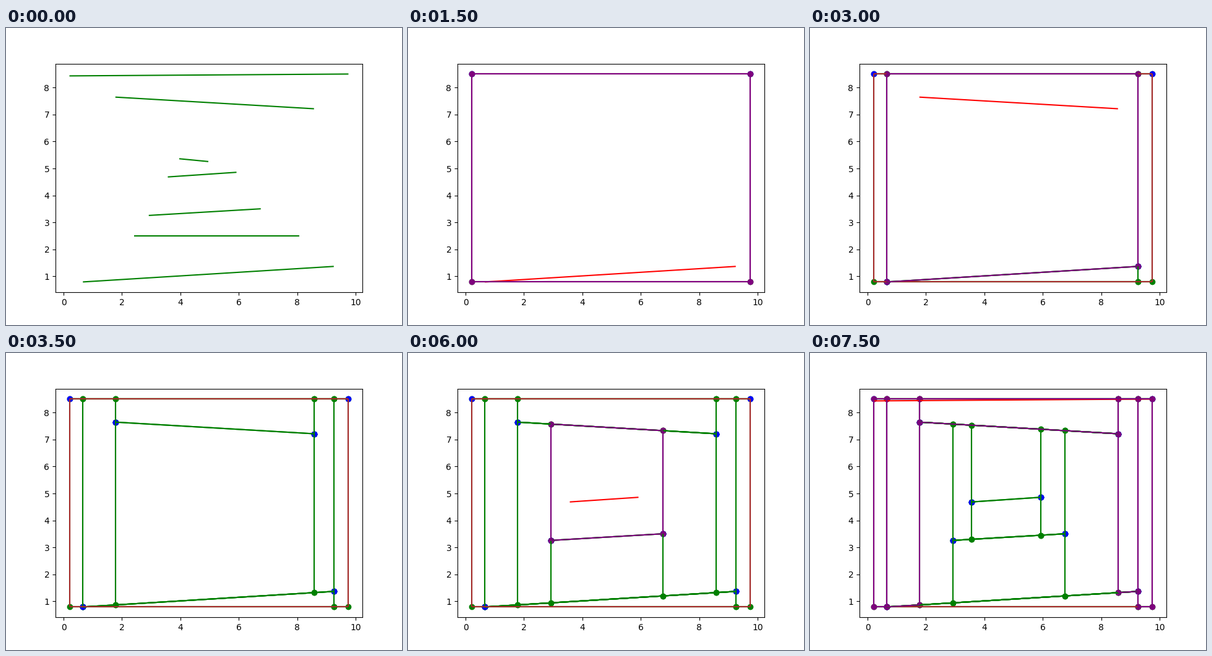
A matplotlib script that plays this animation: 640x480 px, repeating every 8 s.

```python
import matplotlib.pyplot as plt
from matplotlib.animation import FuncAnimation
from matplotlib.collections import LineCollection

X0, X1 = 0.202, 9.751
Y0, Y1 = 0.791, 8.503
TOP = ((X0, Y1), (X1, Y1))
BOTTOM = ((X0, Y0), (X1, Y0))

# Segments in order of insertion; the last two never get inserted.
SEGMENTS = [
    ((0.662, Y0), (9.249, 1.367)),
    ((1.774, 7.647), (8.572, 7.215)),
    ((2.917, 3.258), (6.750, 3.504)),
    ((3.568, 4.686), (5.919, 4.858)),
    ((X0, 8.434), (X1, Y1)),
    ((2.414, 2.5), (8.068, 2.5)),
    ((3.960, 5.361), (4.955, 5.257)),
]


def y_at(seg, x):
    (xa, ya), (xb, yb) = seg
    return ya + (yb - ya) * (x - xa) / (xb - xa)


class Trapezoid:
    def __init__(self, top, bottom, left, right):
        self.top, self.bottom = top, bottom
        self.left, self.right = left, right

    def side(self, x):
        return (x, y_at(self.bottom, x)), (x, y_at(self.top, x))

    def sides(self):
        return [self.side(self.left[0]), self.side(self.right[0])]

    def outline(self):
        (a, b), (d, c) = self.sides()
        return [(a, b), (b, c), (c, d), (d, a)]

    def crossed_by(self, seg):
        lo = max(self.left[0], seg[0][0])
        hi = min(self.right[0], seg[1][0])
        if lo >= hi:
            return False
        x = (lo + hi) / 2
        return y_at(self.bottom, x) <= y_at(seg, x) <= y_at(self.top, x)

    def split(self, seg):
        p, q = seg
        return [
            Trapezoid(self.top, self.bottom, self.left, p),
            Trapezoid(self.top, seg, p, q),
            Trapezoid(seg, self.bottom, p, q),
            Trapezoid(self.top, self.bottom, q, self.right),
        ]


def insert(traps, seg):
    result = []
    for t in traps:
        result += t.split(seg) if t.crossed_by(seg) else [t]
    return result


# maps[k] is the decomposition after k insertions.
maps = [[Trapezoid(TOP, BOTTOM, *TOP)]]
for s in SEGMENTS[:4]:
    maps.append(insert(maps[-1], s))

fig, ax = plt.subplots(figsize=(6.4, 4.8), dpi=100)


def lines(segs, color):
    ax.add_collection(LineCollection(segs, colors=color))


def dots(points, color):
    ax.scatter(*zip(*points), color=color)


def draw_map(traps):
    for t in traps:
        lines([t.top, t.bottom], "green")
        lines(t.sides(), "green")
        dots([p for side in t.sides() for p in side], "green")
        dots([t.left, t.right], "blue")
    lines(Trapezoid(TOP, BOTTOM, *TOP).outline(), "brown")


def draw(frame):
    ax.clear()
    if frame == 0:
        lines(SEGMENTS, "green")
    else:
        k, phase = divmod(frame - 1, 3)
        seg, traps = SEGMENTS[k], maps[k]
        draw_map(traps)
        if phase == 1:
            lines([seg], "C0")
        elif phase == 2:
            lines([seg], "red")
            for t in traps:
                if t.crossed_by(seg):
                    lines(t.outline(), "purple")
                    dots([edge[0] for edge in t.outline()], "purple")
    mx, my = 0.05 * (X1 - X0), 0.05 * (Y1 - Y0)
    ax.set_xlim(X0 - mx, X1 + mx)
    ax.set_ylim(Y0 - my, Y1 + my)
    return []


anim = FuncAnimation(fig, draw, frames=16, init_func=lambda: draw(0),
                     interval=500, repeat=True, repeat_delay=0)
plt.show()
```
